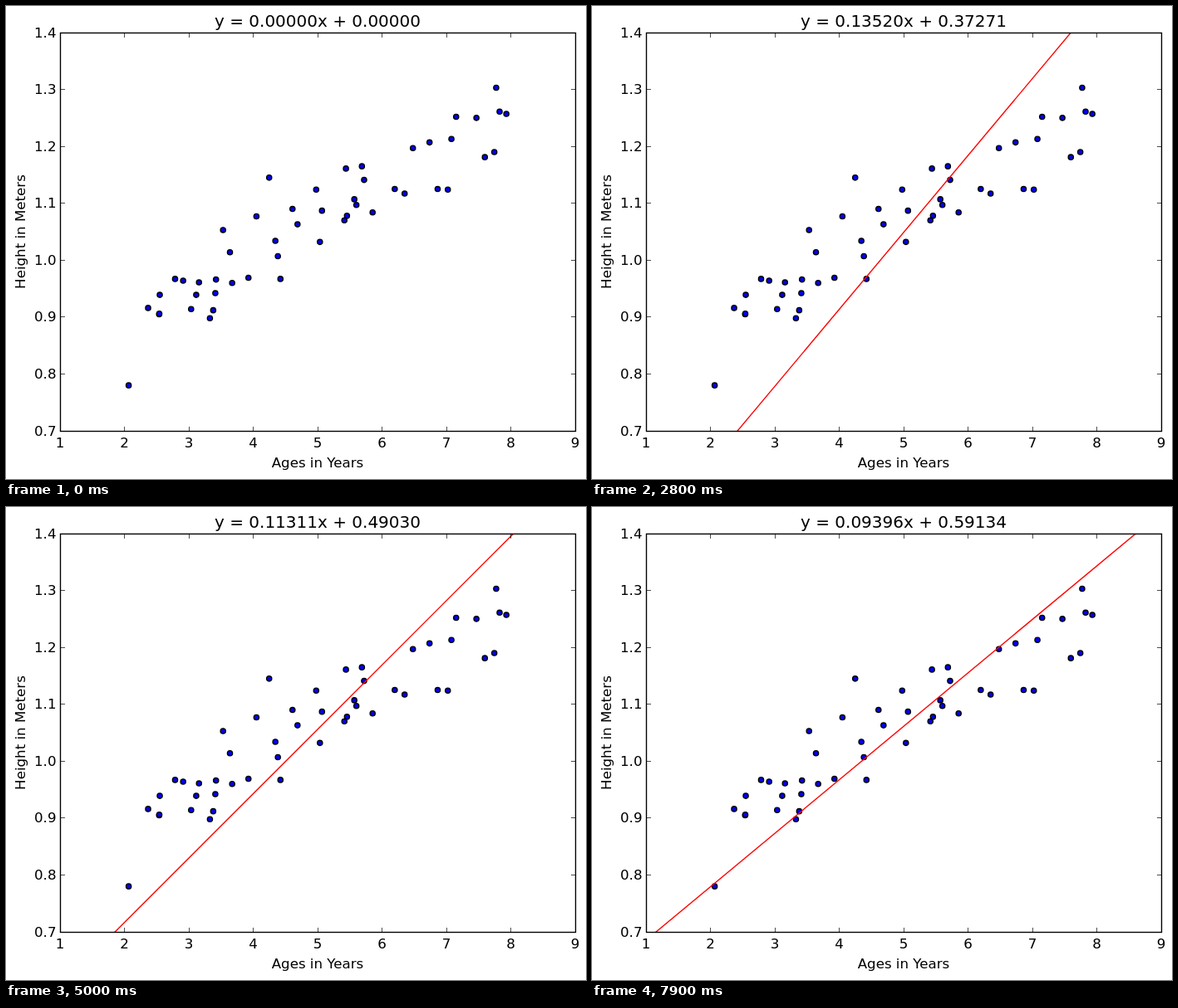
An HTML page for the animation above (8000 ms loop, 698 px wide and 570 px high).

```html
<!DOCTYPE html>
<html lang="en">
<head>
<meta charset="utf-8">
<title>Linear fit by gradient descent</title>
<style>
  html, body { margin: 0; width: 100%; height: 100%; overflow: hidden; background: #fff; }
  svg { display: block; font-family: "DejaVu Sans", Verdana, sans-serif; font-size: 16.667px; }
  .title { font-size: 20px; }
  .mid { text-anchor: middle; }
  .end { text-anchor: end; }
  .dot { fill: #00f; stroke: #000; stroke-width: 1.39; }
  .fit { stroke: #f00; stroke-width: 1.39; }
  .tick { stroke: #000; stroke-width: 0.7; }
  .frame { fill: none; stroke: #000; stroke-width: 1.39; }
</style>
</head>
<body>
<svg id="plot" width="698" height="570" viewBox="0 0 698 570"></svg>
<script>
const LEFT = 65, RIGHT = 685, TOP = 32, BOTTOM = 512;
const STEP = 100, STEPS = 80, TICK = 5.56;

// age, height
const data = [
  [2.066, .780], [2.368, .916], [2.540, .905], [2.542, .906], [2.549, .939],
  [2.787, .967], [2.912, .964], [3.036, .914], [3.115, .939], [3.158, .961],
  [3.328, .898], [3.379, .912], [3.412, .942], [3.422, .966], [3.532, 1.053],
  [3.639, 1.014], [3.673, .960], [3.926, .969], [4.050, 1.077], [4.248, 1.145],
  [4.344, 1.034], [4.383, 1.007], [4.423, .967], [4.610, 1.090], [4.688, 1.063],
  [4.978, 1.124], [5.036, 1.032], [5.068, 1.087], [5.416, 1.070], [5.440, 1.161],
  [5.456, 1.078], [5.570, 1.107], [5.602, 1.097], [5.688, 1.165], [5.722, 1.141],
  [5.854, 1.084], [6.198, 1.125], [6.351, 1.117], [6.480, 1.197], [6.738, 1.207],
  [6.864, 1.125], [7.022, 1.124], [7.078, 1.213], [7.151, 1.252], [7.466, 1.250],
  [7.597, 1.181], [7.744, 1.190], [7.773, 1.303], [7.826, 1.261], [7.931, 1.257]
];

const px = x => LEFT + (x - 1) * (RIGHT - LEFT) / 8;
const py = y => BOTTOM - (y - 0.7) * (BOTTOM - TOP) / 0.7;

const plot = document.getElementById("plot");

function add(tag, attrs, text, parent = plot) {
  const el = document.createElementNS("http://www.w3.org/2000/svg", tag);
  for (const name in attrs) el.setAttribute(name, attrs[name]);
  if (text) el.textContent = text;
  parent.appendChild(el);
  return el;
}

const tick = (x1, y1, x2, y2) => add("line", { class: "tick", x1, y1, x2, y2 });
const box = { x: LEFT + .5, y: TOP + .5, width: RIGHT - LEFT, height: BOTTOM - TOP };

const clip = add("clipPath", { id: "inside" });
add("rect", box, "", clip);

for (const [age, height] of data) {
  add("circle", { class: "dot", cx: px(age).toFixed(2), cy: py(height).toFixed(2), r: 3.1 });
}
const fit = add("line", { class: "fit", "clip-path": "url(#inside)" });

for (let i = 1; i <= 9; i++) {
  const x = Math.floor(px(i)) + .5;
  if (i > 1 && i < 9) {
    tick(x, TOP + .5, x, TOP + .5 + TICK);
    tick(x, BOTTOM + .5, x, BOTTOM + .5 - TICK);
  }
  add("text", { class: "mid", x: px(i), y: 532 }, String(i));
}
for (let i = 7; i <= 14; i++) {
  const y = Math.floor(py(i / 10) + 1e-6) + .5;
  if (i > 7 && i < 14) {
    tick(LEFT + .5, y, LEFT + .5 + TICK, y);
    tick(RIGHT + .5, y, RIGHT + .5 - TICK, y);
  }
  add("text", { class: "end", x: 60.5, y: y + 5.5 }, (i / 10).toFixed(1));
}
add("rect", { class: "frame", ...box });

add("text", { class: "mid", x: 375, y: 556 }, "Ages in Years");
add("text", { class: "mid", transform: "translate(23 272) rotate(-90)" }, "Height in Meters");
const title = add("text", { class: "title mid", x: 375, y: 25 });

// Descent towards the best fit: a slow decay plus a fast alternating one.
const SLOW = Math.exp(-0.0169074);
const intercept = n => 0.751002 - 0.607123 * SLOW ** n - 0.143877 * (-0.77895) ** n;
const slope = n => 0.063711 + 0.11504 * SLOW ** n - 0.178751 * (-0.77859) ** n;

function show(n) {
  const a = slope(n), b = intercept(n);
  title.textContent = `y = ${Math.abs(a).toFixed(5)}x + ${Math.abs(b).toFixed(5)}`;
  fit.setAttribute("x1", px(0));
  fit.setAttribute("y1", py(b));
  fit.setAttribute("x2", px(10));
  fit.setAttribute("y2", py(10 * a + b));
}

const start = performance.now();
let shown = 0;
show(0);

function draw() {
  const n = Math.floor((performance.now() - start) / STEP) % STEPS;
  if (n !== shown) show(shown = n);
  requestAnimationFrame(draw);
}
requestAnimationFrame(draw);
</script>
</body>
</html>
```
